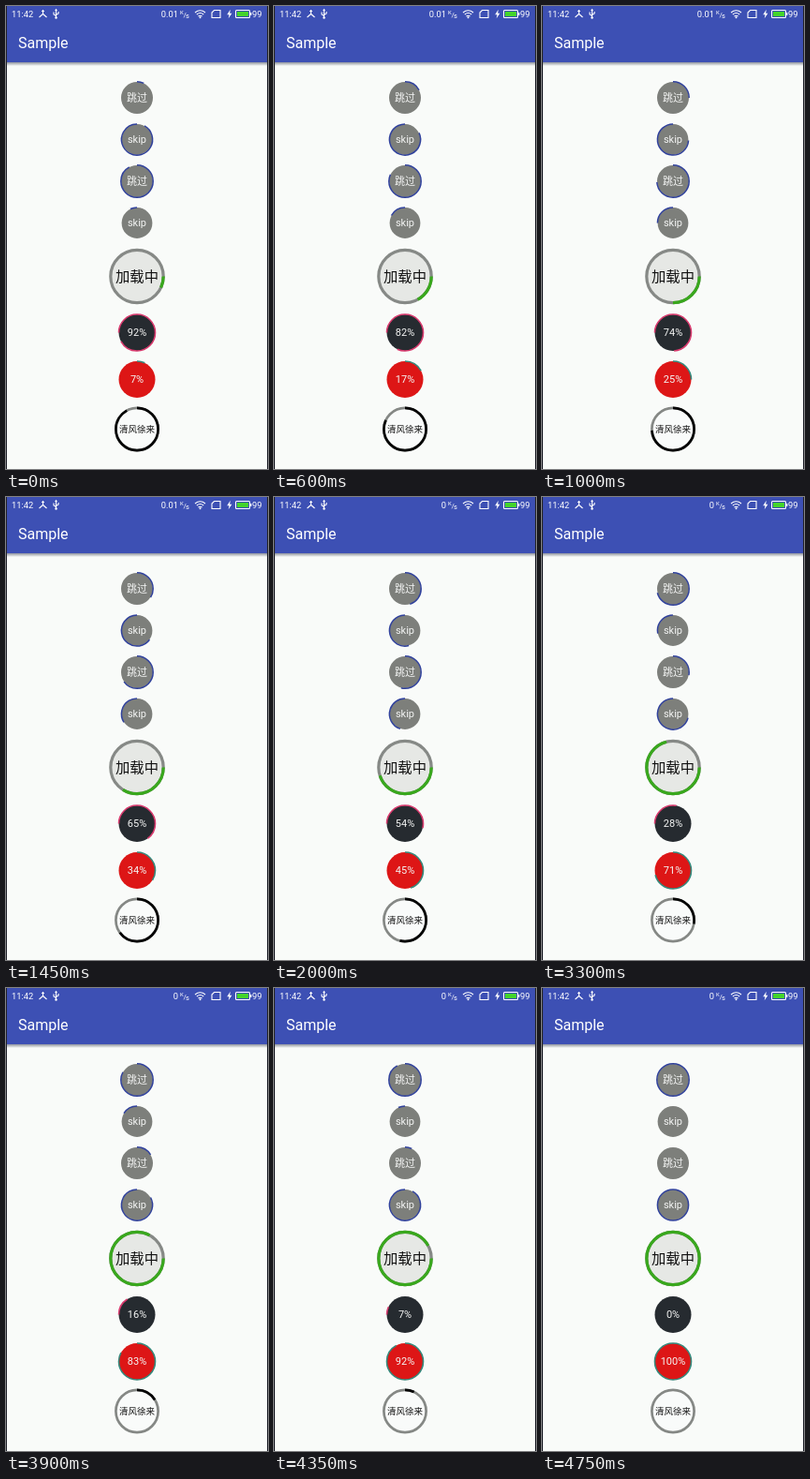
Recreate the animation shown at these times as an HTML page. Size 280 px wide and 494 px high, loop 4.95 s.

```html
<!DOCTYPE html>
<html lang="zh">
<head>
<meta charset="utf-8">
<title>Sample</title>
<style>
html, body { margin: 0; width: 100%; height: 100%; overflow: hidden; background: #f9fbf9; }
svg { display: block; width: 280px; height: 494px; font-family: Roboto, "Noto Sans CJK SC", "Noto Sans CJK", sans-serif; }
.mid { text-anchor: middle; }
.bar { fill: #fff; font-size: 9.3px; }
.line { fill: none; stroke: #fff; stroke-width: 1.1; }
</style>
</head>
<body>
<svg viewBox="0 0 280 494">
  <defs>
    <linearGradient id="shade" x2="0" y2="1">
      <stop stop-color="#8f939d"/>
      <stop offset="1" stop-color="#f9fbf9"/>
    </linearGradient>
  </defs>
  <rect width="280" height="494" fill="#f9fbf9"/>
  <rect y="60" width="280" height="4" fill="url(#shade)"/>
  <rect width="280" height="60" fill="#3d50b4"/>
  <text x="13" y="45" font-size="16" fill="#fff">Sample</text>

  <g class="bar">
    <text x="6" y="12">11:42</text>
    <text id="speed" x="184" y="12" text-anchor="end"></text>
    <text x="186" y="9" font-size="6">K</text>
    <text x="189.5" y="12" font-size="8">/</text>
    <text x="192" y="13" font-size="7.5">s</text>
    <text x="263" y="12">99</text>
    <path class="line" d="M39.5 4v4.5l-4 3.5M39.5 8.5l4 3.5M38 5.5h3"/>
    <path class="line" d="M53.5 4v9M51 6.5v2.5l2.500 1.500M56 6v2l-2.500 1.500"/>
    <path d="M53.500 2.800l1.500 2.200h-3z"/>
    <circle cx="53.500" cy="12.500" r="1.200"/>
    <path class="line" d="M202 7q5.500 -4.500 11 0M203.800 9q3.700 -3 7.400 0M205.500 11q2 -1.500 4 0"/>
    <circle cx="207.500" cy="12.300" r="1"/>
    <path class="line" d="M222.500 4.500h6.500v8h-9v-5.500z"/>
    <path d="M239.800 3.800l-3.600 5.400h2.300l-.8 4 3.700-5.400h-2.300z"/>
    <rect class="line" x="245.500" y="4.500" width="15" height="8" rx="1"/>
    <rect x="247" y="6" width="12" height="5" style="fill:#43d32c"/>
    <rect x="261.200" y="7" width="1.200" height="3"/>
  </g>

  <g id="dials"></g>
  <path d="M.5 0V494M279.500 0V494" stroke="#20222a"/>
</svg>
<script>
const NS = 'http://www.w3.org/2000/svg';
const LOOP = 4950, STEP = 50, LAST = 4750;
const GREY = '#7d7f7b', BLUE = '#30419c', TOP = -90;
const dials = document.getElementById('dials');
const speed = document.getElementById('speed');

const grow = (done, left) => [TOP, done];
const growBack = (done, left) => [TOP - 3.6 * done, done];
const shrink = (done, left) => [TOP, left];
const shrinkBack = (done, left) => [TOP - 3.6 * left, left];

const table = [
  { y: 98, r: 17, fill: GREY, ring: 17.2, w: 1.5, color: BLUE, arc: grow, text: '跳过' },
  { y: 142.5, r: 16.4, fill: GREY, ring: 16.6, w: 1.5, color: BLUE, arc: shrinkBack, text: 'skip' },
  { y: 187, r: 17, fill: GREY, ring: 17.2, w: 1.5, color: BLUE, arc: shrink, text: '跳过' },
  { y: 231.5, r: 16.4, fill: GREY, ring: 16.6, w: 1.5, color: BLUE, arc: growBack, text: 'skip' },
  { y: 288.5, r: 28, fill: '#e6e8e5', ring: 28.2, w: 3.2, color: '#39a81d', base: '#868986',
    arc: done => [0, done], text: '加载中', size: 15.3, ink: '#111' },
  { y: 348.5, r: 19.5, fill: '#262b30', ring: 19.5, w: 1.6, color: '#d93a6e',
    arc: (done, left) => [180, left], text: (done, left) => left + '%' },
  { y: 398.5, r: 19.5, fill: '#dd1616', ring: 19.5, w: 1.6, color: '#35897c',
    arc: grow, text: done => done + '%' },
  { y: 451.5, r: 22, fill: '#f9fbfa', ring: 22.6, w: 2.7, color: '#050505', base: '#858885',
    arc: shrink, text: '清风徐来', size: 9.5, ink: '#111' }
];

function add(name, attrs) {
  const el = document.createElementNS(NS, name);
  for (const key in attrs) el.setAttribute(key, attrs[key]);
  return dials.appendChild(el);
}

for (const d of table) {
  const spot = { cx: 140, cy: d.y };
  const ring = { ...spot, r: d.ring, fill: 'none', 'stroke-width': d.w };
  const size = d.size || 11;
  add('circle', { ...spot, r: d.r, fill: d.fill });
  if (d.base) add('circle', { ...ring, stroke: d.base });
  d.ringEl = add('circle', { ...ring, stroke: d.color, pathLength: 100 });
  d.label = add('text', { class: 'mid', x: 140, y: d.y + size * 0.36, 'font-size': size, fill: d.ink || '#f4f5f4' });
  if (typeof d.text === 'string') d.label.textContent = d.text;
}

function draw(now) {
  const t = Math.min(LAST, Math.floor(now % LOOP / STEP) * STEP);
  const done = t < 600 ? Math.floor(7 + t / 60) : 5 + t / STEP;
  const left = Math.max(0, 99 - done);
  speed.textContent = t < 2000 ? '0.01' : '0';
  for (const d of table) {
    const [start, length] = d.arc(done, left);
    d.ringEl.setAttribute('transform', `rotate(${start} 140 ${d.y})`);
    d.ringEl.setAttribute('stroke-dasharray', `${length} 200`);
    if (typeof d.text === 'function') d.label.textContent = d.text(done, left);
  }
}

const origin = performance.now();
function tick() {
  draw(performance.now() - origin);
  requestAnimationFrame(tick);
}
tick();
</script>
</body>
</html>
```
